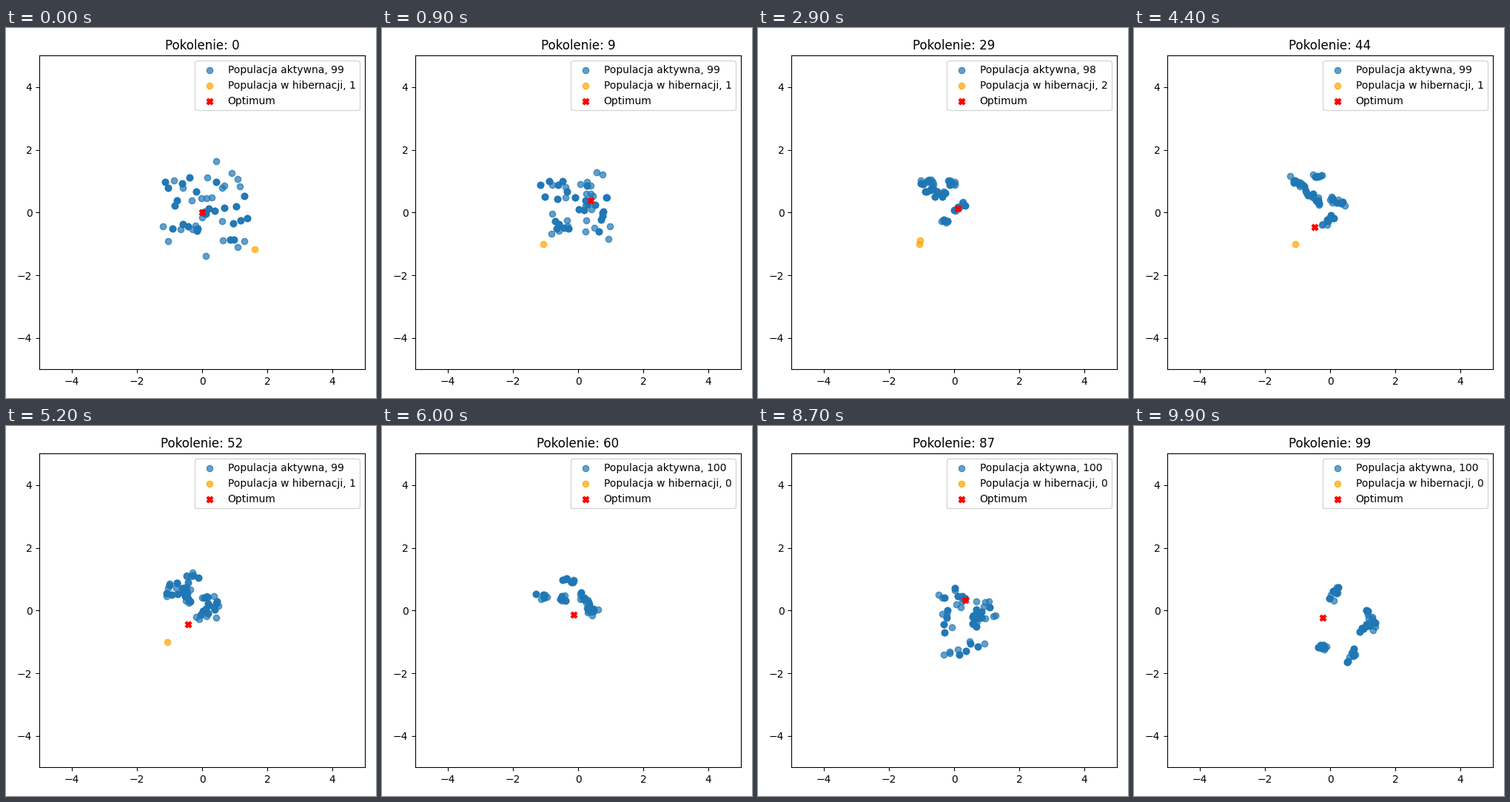
Write a matplotlib script that moves like this. It is 500 by 500 pixels and loops after 10 s.

```python
import numpy as np
import matplotlib.pyplot as plt
from matplotlib.animation import FuncAnimation

GENERATIONS = 100
SPOTS = 50
COPIES = np.tile([3, 1], SPOTS // 2)  # 100 individuals share the spots

# Streaks (x0, y0, x1, y1) along which the population gathers
STREAKS = {
    19: [(-.86, .9, -.3, .68), (-.02, .65, .3, .55), (.22, .22, .54, .22),
         (.36, .5, .4, .15), (-.52, -.38, -.64, -.63)],
    29: [(-1.09, 1.02, -.6, .95), (-.86, .68, -.25, .62),
         (-.25, 1, .09, .86), (.02, .08, .35, .36),
         (-.41, -.27, -.16, -.27)],
    44: [(-1.18, 1.1, -.8, .8), (-.55, 1.21, -.3, 1.15),
         (-.73, .72, -.25, .29), (-.02, .5, .43, .25),
         (-.25, -.4, .09, -.13)],
    60: [(-1.18, .45, -.98, .45), (-.57, .3, -.4, .45),
         (-.48, 1, -.1, .95), (.12, .55, .38, -.05), (.3, -.08, .61, .03)],
    75: [(-.05, .8, .05, .58), (-.5, .57, -.2, .2), (.15, .2, .5, -.15),
         (.55, -.15, .9, .3), (.55, -.85, .65, -.97),
         (-.52, -1.1, -.32, -1.2)],
    99: [(.05, .4, .23, .75), (-.36, -1.18, -.07, -1.1),
         (1.18, -.03, 1.35, -.45), (.86, -.58, 1.3, -.52),
         (.52, -1.55, .77, -1.25)],
}

rng = np.random.default_rng(7)


def scatter_start():
    """First population: a disc, denser in the middle."""
    r = 1.7 * rng.random(SPOTS) ** 0.7
    a = rng.uniform(0, 2 * np.pi, SPOTS)
    return np.column_stack([0.1 + 0.9 * r * np.cos(a), r * np.sin(a)])


def gather(streaks):
    """Share the spots out along the streaks, by length."""
    s = np.array(streaks)
    a, b = s[:, :2], s[:, 2:]
    edges = np.append(0, np.cumsum(np.hypot(*(b - a).T) + 0.1))
    pos = (np.arange(SPOTS) + 0.5) / SPOTS * edges[-1]
    k = np.searchsorted(edges, pos) - 1
    t = ((pos - edges[k]) / np.diff(edges)[k])[:, None]
    return a[k] + t * (b - a)[k] + rng.normal(0, 0.05, (SPOTS, 2))


def match(old, new):
    """Reorder new so that each spot follows a nearby old one."""
    free, order = list(range(SPOTS)), []
    for p in old:
        j = min(free, key=lambda k: np.hypot(*(new[k] - p)))
        free.remove(j)
        order.append(j)
    return new[order]


def evolve(old, new, steps):
    """Random mutations that lead from one population to the next."""
    hit = rng.random((steps, SPOTS)) < 0.35
    hit[rng.integers(steps, size=SPOTS), np.arange(SPOTS)] = True
    u = (hit.cumsum(0) / hit.sum(0))[..., None]
    walk = (hit[..., None] * rng.normal(0, 0.08, (steps, SPOTS, 2))).cumsum(0)
    return old + u * (new - old) + walk - u * walk[-1]


path = scatter_start()[None]
for gen, streaks in STREAKS.items():
    old = path[-1]
    new = match(old, gather(streaks))
    path = np.concatenate([path, evolve(old, new, gen + 1 - len(path))])

# First and last generation of each sleep; all but the first share a corner
SLEEPS = np.array([(0, 5), (2, 8), (9, 52), (13, 24), (15, 22), (17, 26),
                   (25, 37), (63, 65), (69, 72), (80, 84)])
beds = rng.normal((-1, -0.92), 0.07, (len(SLEEPS), 2))
beds[0] = 1.61, -1.17

fig, ax = plt.subplots(figsize=(5, 5), dpi=100)
ax.set(xlim=(-5, 5), ylim=(-5, 5))
active = ax.scatter([], [], alpha=0.7, label="Populacja aktywna, 99")
asleep = ax.scatter([], [], color="orange", alpha=0.7,
                    label="Populacja w hibernacji, 1")
optimum = ax.scatter([], [], color="red", marker="X", label="Optimum")
title = ax.set_title("Pokolenie: 0")
labels = ax.legend(loc="upper right").get_texts()
fig.tight_layout()


def update(gen):
    resting = beds[(SLEEPS[:, 0] <= gen) & (gen <= SLEEPS[:, 1])]
    active.set_offsets(np.repeat(path[gen], COPIES, axis=0))
    asleep.set_offsets(resting)
    optimum.set_offsets([[0.5 * np.sin(0.1 * gen)] * 2])
    title.set_text(f"Pokolenie: {gen}")
    labels[0].set_text(f"Populacja aktywna, {100 - len(resting)}")
    labels[1].set_text(f"Populacja w hibernacji, {len(resting)}")
    return active, asleep, optimum, title


anim = FuncAnimation(fig, update, frames=GENERATIONS, interval=100,
                     repeat=True, repeat_delay=0)
plt.show()
```
